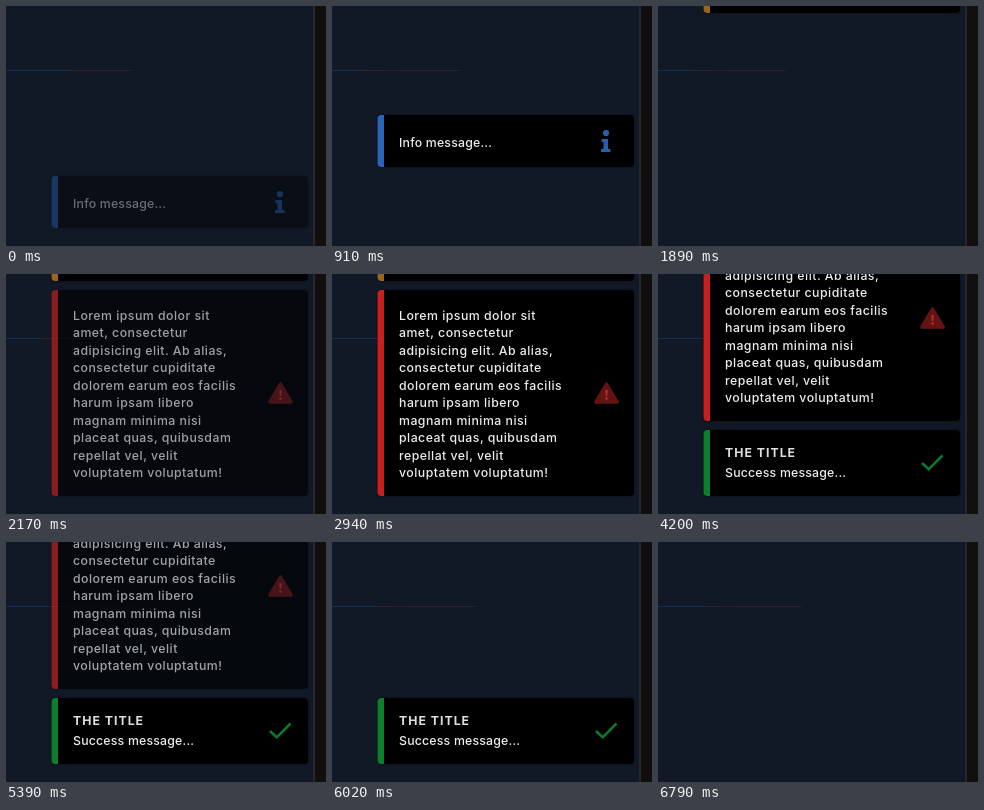
These frames come from a looping animation (320x240 px, 7420 ms). An HTML page:

```html
<!DOCTYPE html>
<html lang="en">
<head>
<meta charset="utf-8">
<title>Toast messages</title>
<style>
  html, body { margin: 0; width: 100%; height: 100%; overflow: hidden; background: #111826; }
  svg { display: block; width: 320px; height: 240px; }
  text { font: 500 12.3px Inter, "Open Sans", sans-serif; fill: #ececec; }
  .message { letter-spacing: .2px; }
  .para { letter-spacing: .48px; }
  .title { font-weight: 700; letter-spacing: 1px; fill: #dedede; }
  .box { filter: drop-shadow(0 0 1.2px #0006); }
</style>
</head>
<body>
<svg id="stage" viewBox="0 0 320 240">
  <defs>
    <linearGradient id="fade">
      <stop offset="0" stop-color="#2b292e"/>
      <stop offset="1" stop-color="#242228"/>
    </linearGradient>
  </defs>
  <rect width="320" height="240" fill="#111826"/>
  <rect x="309" width="11" height="240" fill="#100f0d"/>
  <rect x="307" width="2" height="240" fill="#29262b"/>
  <rect id="lineTail" y="64" height="1" fill="url(#fade)"/>
  <rect id="lineHead" y="64" height="1" fill="#153058"/>
</svg>
<script>
const LOOP = 7420, STEP = 70, FADE = 700, BOTTOM = 222;
const stage = document.getElementById('stage');
const head = document.getElementById('lineHead');
const tail = document.getElementById('lineTail');

const lorem = [
  'Lorem ipsum dolor sit', 'amet, consectetur', 'adipisicing elit. Ab alias,',
  'consectetur cupiditate', 'dolorem earum eos facilis', 'harum ipsam libero',
  'magnam minima nisi', 'placeat quas, quibusdam', 'repellat vel, velit',
  'voluptatem voluptatum!'
];

const line = (text, y, kind = 'message') =>
  `<text class="${kind}" x="67" y="${y}">${text}</text>`;

// Icons are drawn around (274, 0) at the middle of each toast.
const icons = {
  info: `<g fill="#2560ad"><circle cx="274" cy="-8" r="3.1"/>
    <path d="M269.5-2h6.5v10h2.5v3h-9.5v-3h2.5v-7h-2z"/></g>`,
  warning: `<g fill="#9c661c"><path d="M271-11h6l-1 15h-4z"/><circle cx="274" cy="8" r="3"/></g>`,
  error: `<path d="M274.5-9 285.2 9H263.8z" fill="#651312" stroke="#651312" stroke-width="3.4" stroke-linejoin="round"/>
    <path d="M273.3-3h2.4l-.5 6h-1.4z" fill="#b03434"/><circle cx="274.5" cy="5.5" r="1.3" fill="#b03434"/>`,
  success: `<path d="M264 0l6.7 6.3L284.5-7.5" fill="none" stroke="#0b7a2a" stroke-width="2.6"/>`
};

const toasts = [
  { icon: 'info', color: '#2a66b8', height: 52, born: -158, gone: 2900,
    body: line('Info message...', 31.5) },
  { icon: 'warning', color: '#9c661c', height: 52, born: 910, gone: 3920,
    body: line('Warning message...', 31.5) },
  { icon: 'error', color: '#c9201f', height: 206, born: 1890, gone: 4900,
    body: lorem.map((text, i) => line(text, 30 + i * 17.45, 'para')).join('') },
  { icon: 'success', color: '#0b7f2c', height: 66, born: 3150, gone: 6090,
    body: line('THE TITLE', 27, 'title') + line('Success message...', 47) }
];

for (const toast of toasts) {
  const { height, color, icon, body } = toast;
  const g = document.createElementNS('http://www.w3.org/2000/svg', 'g');
  g.innerHTML = `<rect class="box" x="45.5" width="256.5" height="${height}" rx="4"/>
    <path d="M52 0V${height}H49.5a4 4 0 0 1-4-4V4a4 4 0 0 1 4-4z" fill="${color}"/>
    ${body}<g transform="translate(0 ${height / 2})">${icons[icon]}</g>`;
  stage.append(g);
  toast.el = g;
}

// Start time, end of the blue part, end of the line
const lineSteps = [[0, 65, 126], [840, 32, 128], [2380, 45, 128], [5950, 44, 144]];

const clamp = v => Math.min(1, Math.max(0, v));
const fadeIn = p => 1 - (1 - p) ** 2;
const fadeOut = p => 1 - p ** 3;

function draw(t) {
  const [, blue, end] = lineSteps.filter(s => s[0] <= t).pop();
  head.setAttribute('width', blue);
  tail.setAttribute('width', end);

  // Newest sits at the bottom and pushes the others up at once.
  let y = BOTTOM;
  for (const { el, height, born, gone } of [...toasts].reverse()) {
    const alpha = fadeIn(clamp((t - born) / FADE)) * fadeOut(clamp((t - gone) / FADE));
    el.setAttribute('opacity', alpha);
    if (t < born) continue;
    el.setAttribute('transform', `translate(0 ${y - height})`);
    y -= height + 9;
  }
}

const start = performance.now();
function tick() {
  const t = (performance.now() - start) % LOOP;
  draw(Math.floor(t / STEP) * STEP);
  requestAnimationFrame(tick);
}
tick();
</script>
</body>
</html>
```
